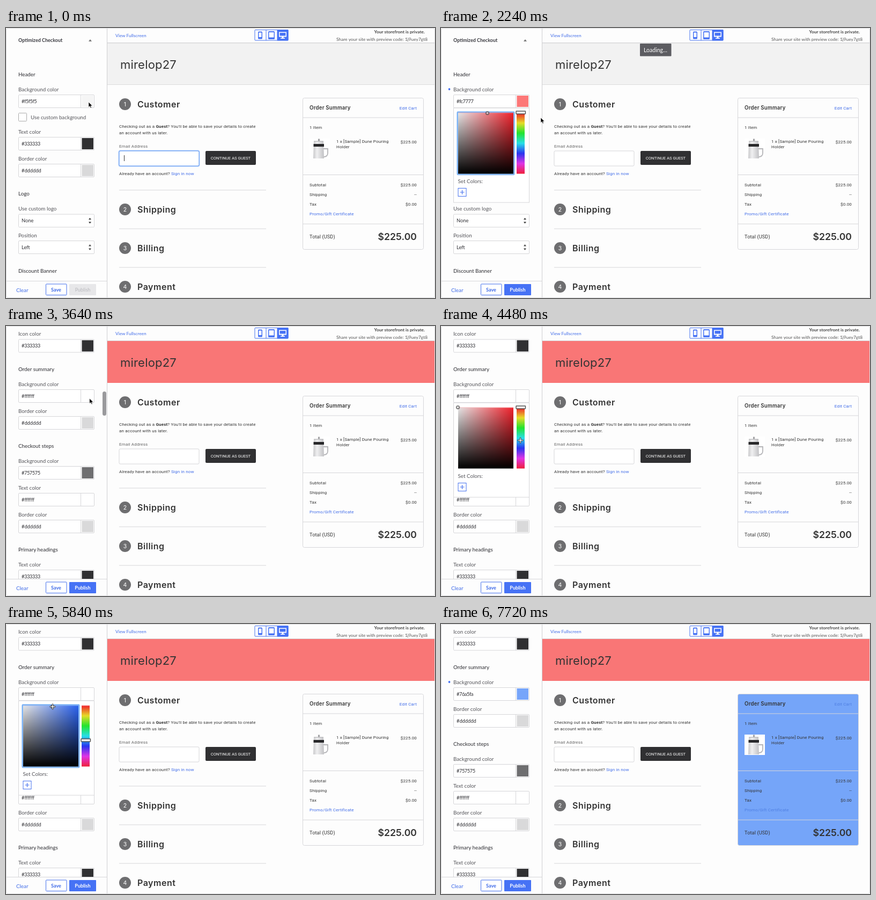
An HTML page that plays this animation: 800 by 503 pixels, repeating every 7.76 s.

```html
<!DOCTYPE html>
<html lang="en">
<head>
<meta charset="utf-8">
<title>Checkout theme editor</title>
<style>
html, body { margin: 0; width: 100%; height: 100%; overflow: hidden; background: #fdfdfd; }
svg { display: block; width: 100vw; height: 100vh; }
text { white-space: pre; fill: #333; }

/* editor type */
.ui { font: 9.8px Lato, sans-serif; fill: #55555a; }
.group { font: 9.8px Lato, sans-serif; fill: #2b2b30; }
.title { font: 700 9px Lato, sans-serif; fill: #3a3a40; }
.value { font: 9.3px Lato, sans-serif; fill: #2f2f34; }
.digits { letter-spacing: -.45px; }
.bar { font: 8.4px Lato, sans-serif; fill: #555; }
.strong { font-weight: 700; fill: #444; }
.toast { font: 10.5px Lato, sans-serif; fill: #fff; }
.link { fill: #3f6be8; }
.button { font: 700 9px Lato, sans-serif; }
.white { fill: #fff; }
.muted { font-weight: 400; fill: #b9b9bd; }

/* storefront type */
.shop { font: 22px Inter, sans-serif; letter-spacing: .2px; fill: #333; }
.step { font: 600 16px Inter, sans-serif; letter-spacing: .5px; fill: #333; }
.num { font: 10.5px Inter, sans-serif; fill: #fff; }
.card { font: 600 9.7px Inter, sans-serif; letter-spacing: .2px; }
.body { font: 8px Roboto, sans-serif; letter-spacing: .17px; }
.soft { fill: #666; }
.total { font: 9.2px Roboto, sans-serif; letter-spacing: .1px; }
.price { font: 600 17.7px Inter, sans-serif; }
.cta { font: 7.7px Roboto, sans-serif; fill: #fff; }
.end { text-anchor: end; }
.mid { text-anchor: middle; }

.box { fill: #fff; stroke: #d6d6d9; }
.rule { stroke: #d6d6d9; fill: none; }
.blueLine { fill: #fff; stroke: #4470ee; }
.blue { fill: #4672f5; }

/* timeline: everything shares one 7760 ms loop */
.t { animation: 7760ms step-end infinite; }
.start { animation-name: start; }
.after1 { animation-name: after1; }
.before1 { animation-name: before1; }
.after2 { animation-name: after2; }
.before2 { animation-name: before2; }
#toast { animation-name: toast; }
#head { animation-name: head; }
#card { animation-name: card; }
.cardLink { animation-name: cardLink; }
#scroll { animation-name: scroll; }
#thumb { animation-name: thumb; }
#cursor { animation-name: cursor; }
#arrow { animation-name: arrow; }
#cross { animation-name: cross; }
#pick1 { animation-name: pick1; }
#pick2 { animation-name: pick2; }
#pick1 .ring { animation-name: ring1; }
#pick2 .ring { animation-name: ring2; }
#pick1 .dot { animation-name: dot1; }
#pick2 .dot { animation-name: dot2; }
#pick1 .hue { fill: #f0222c; }
#pick2 .hue { animation-name: hue; }
#pick2 .slider { animation-name: slider; }

@keyframes start { 0% { opacity: 1 } 5.67%, to { opacity: 0 } }
@keyframes before1 { 0% { opacity: 1 } 20.6%, to { opacity: 0 } }
@keyframes after1 { 0% { opacity: 0 } 20.6%, to { opacity: 1 } }
@keyframes before2 { 0% { opacity: 1 } 76.3%, to { opacity: 0 } }
@keyframes after2 { 0% { opacity: 0 } 76.3%, to { opacity: 1 } }
@keyframes toast { 0%, 34.5%, 91.8%, to { opacity: 0 } 27.3%, 83.5% { opacity: 1 } }
@keyframes head { 0% { fill: #f2f2f2; stroke: #dcdcdc } 34.5%, to { fill: #f97676; stroke: #f97676 } }
@keyframes card { 0% { fill: #fdfdfd } 91.8%, to { fill: #75a5f9 } }
@keyframes cardLink { 0% { fill: #3f6be8 } 91.8%, to { fill: #4f7fe2 } }
@keyframes pick1 { 0%, 29.9%, to { visibility: hidden } 5.67% { visibility: visible } }
@keyframes pick2 { 0%, 83.5%, to { visibility: hidden } 50% { visibility: visible } }
@keyframes ring1 { 0% { opacity: 0 } 15.5%, to { opacity: 1 } }
@keyframes ring2 { 0% { opacity: 0 } 73.7%, to { opacity: 1 } }
@keyframes dot1 {
  0% { transform: translate(31.5px, 25px) }
  15.5% { transform: translate(92px, 26.5px); animation-timing-function: ease-in-out }
  18%, to { transform: translate(86.5px, 22px) }
}
@keyframes dot2 {
  0% { transform: translate(31.5px, 21px) }
  73.7%, to { transform: translate(86.5px, 23.5px) }
}
@keyframes hue { 0% { fill: #f0222c } 59.3%, to { fill: #2a62ee } }
@keyframes slider {
  0% { transform: none }
  59.3% { transform: translateY(62px); animation-timing-function: linear }
  61.3%, to { transform: translateY(65px) }
}
@keyframes scroll {
  0% { transform: none }
  30.93% { transform: none; animation-timing-function: cubic-bezier(.4, 0, .7, .8) }
  36.6% { transform: translateY(-447px); animation-timing-function: ease-out }
  41.24%, to { transform: translateY(-565px) }
}
@keyframes thumb {
  0% { transform: translateY(2px); opacity: 0 }
  30.93% { transform: translateY(2px); opacity: 1; animation-timing-function: cubic-bezier(.4, 0, .7, .8) }
  36.6% { transform: translateY(97px); opacity: 1; animation-timing-function: ease-out }
  41.24% { transform: translateY(122px); opacity: 1 }
  46.4% { transform: translateY(122px); opacity: 1; animation-timing-function: linear }
  49.5%, to { transform: translateY(122px); opacity: 0 }
}
@keyframes cursor {
  0%, 5.67% { transform: translate(154px, 138px); animation-timing-function: ease-in-out }
  13.4%, 14.95% { transform: translate(92px, 163px); animation-timing-function: ease-in-out }
  18%, 20.1% { transform: translate(87px, 158px); animation-timing-function: ease-in-out }
  26.3%, 41.75% { transform: translate(186px, 167px); animation-timing-function: ease-in-out }
  48.45%, 50% { transform: translate(152px, 131px); animation-timing-function: ease-in-out }
  56.7%, 58.8% { transform: translate(148px, 213px); animation-timing-function: ease-in-out }
  61.3%, 64.4% { transform: translate(148px, 216px); animation-timing-function: ease-in-out }
  73.2%, 76.8% { transform: translate(87px, 154px); animation-timing-function: ease-in-out }
  82.5%, 90.2% { transform: translate(186px, 167px); animation-timing-function: ease-in }
  95.4%, to { transform: translate(186px, 515px) }
}
@keyframes arrow { 0%, 23.6%, 80.4%, to { opacity: 1 } 8.2%, 52% { opacity: 0 } }
@keyframes cross { 0%, 23.6%, 80.4%, to { opacity: 0 } 8.2%, 52% { opacity: 1 } }
</style>
</head>
<body>
<svg viewBox="0 0 800 503" preserveAspectRatio="none">
  <defs>
    <linearGradient id="toWhite"><stop stop-color="#e6e6e6"/><stop offset="1" stop-color="#e6e6e6" stop-opacity="0"/></linearGradient>
    <linearGradient id="toBlack" x2="0" y2="1"><stop stop-opacity="0"/><stop offset="1"/></linearGradient>
    <linearGradient id="rainbow" x2="0" y2="1">
      <stop stop-color="#f0202c"/><stop offset=".167" stop-color="#e6dc28"/><stop offset=".333" stop-color="#22e42e"/>
      <stop offset=".5" stop-color="#28dfe8"/><stop offset=".667" stop-color="#2a34f0"/>
      <stop offset=".833" stop-color="#e034e6"/><stop offset="1" stop-color="#f0203a"/>
    </linearGradient>
    <linearGradient id="steel"><stop stop-color="#c9c9cb"/><stop offset=".35" stop-color="#f0f0f1"/><stop offset="1" stop-color="#c2c2c5"/></linearGradient>
    <clipPath id="panel"><path d="M0 0H188V471H0z"/></clipPath>
  </defs>
  <rect width="800" height="503" fill="#fdfdfd"/>

  <!-- storefront -->
  <rect id="head" class="t" x="188.5" y="28" width="613" height="77.5"/>
  <path class="rule" d="M189 27.5H800"/>
  <path class="rule" d="M211 302H485M211 374H485M211 446H485"/>
  <rect class="box" x="211" y="229" width="149" height="28" rx="2"/>
  <g class="t start">
    <rect x="211" y="229" width="149" height="28" rx="2" fill="none" stroke="#b9d3fb" stroke-width="3"/>
    <rect x="211" y="229" width="149" height="28" rx="2" fill="#fff" stroke="#4f8df0"/>
    <path d="M220.5 237V248" stroke="#333"/>
  </g>
  <rect x="372" y="229" width="94" height="26" rx="2" fill="#303032"/>
  <rect id="card" class="t" x="553.5" y="130.5" width="225" height="282" rx="3" stroke="#d6d6d9"/>
  <path class="rule" d="M554 167H778M554 273.5H778M554 365H778"/>
  <g>
    <rect x="566" y="206" width="38" height="38" fill="#fff"/>
    <path d="M592 225H600V233Q600 240 592 240" fill="none" stroke="#b4b4b7" stroke-width="1.8"/>
    <path d="M574 211H592L593 243H573z" fill="url(#steel)"/>
    <path d="M574 211H592" stroke="#a8a8ab"/>
    <path d="M582 206.500H585V210.500H582z" fill="#a0a0a3"/>
    <path d="M573.500 216H593V221H573.500z" fill="#29292b"/>
  </g>
  <g id="store"></g>

  <!-- top bar -->
  <g>
    <rect class="blueLine" x="464" y="3.500" width="62" height="19.500" rx="1"/>
    <path class="blueLine" d="M485 3.500V23"/>
    <rect class="blue" x="505.500" y="3" width="21" height="20.500" rx="1"/>
    <rect class="blue" x="470" y="6.500" width="8" height="14" rx="1.500"/>
    <path d="M471.500 8.500H476.500V17H471.500z" fill="#fff"/>
    <rect class="blue" x="489" y="6" width="12" height="15" rx="1.500"/>
    <path d="M490.500 8H499.500V17.500H490.500z" fill="#fff"/>
    <path d="M509 7.500H523V16.500H509zM514.500 16H517.500V18.500H520V20H512V18.500H514.500z" fill="#fff"/>
    <path class="blue" d="M510.500 9H521.500V14.500H510.500z"/>
  </g>
  <g id="toast" class="t">
    <rect x="371" y="29" width="58.500" height="23.500" rx="1" fill="#5c5c61"/>
  </g>

  <!-- editor panel -->
  <rect width="188" height="503" fill="#fdfdfd"/>
  <g clip-path="url(#panel)">
    <g id="scroll" class="t"></g>
    <rect id="thumb" class="t" x="180" width="7" height="45" rx="3.500" fill="#858588"/>
  </g>
  <path class="rule" d="M0 471.500H188"/>
  <path d="M188.500 0V503" stroke="#cfcfd2"/>
  <rect class="blueLine" x="74.500" y="477" width="38.500" height="20.500" rx="1"/>
  <rect x="118" y="477" width="50" height="21" rx="1" fill="#e7e7e9"/>
  <g id="foot"></g>
  <rect x=".5" y=".5" width="799" height="502" rx="3" fill="none" stroke="#dedee0"/>

  <g id="cursor" class="t">
    <path id="arrow" class="t" d="M0 0V9.500L2.200 7.500L3.800 11L5.400 10.300L3.900 7H7z" fill="#000" stroke="#fff" stroke-width=".6"/>
    <path id="cross" class="t" d="M-1-5H1V-1H5V1H1V5H-1V1H-5V-1H-1z" fill="#fff" stroke="#333" stroke-width=".8"/>
  </g>
</svg>
<script>
const $ = id => document.getElementById(id);
const add = (id, markup) => $(id).insertAdjacentHTML('beforeend', markup);

// y is the middle of the capitals
const text = (x, y, s, cls) => `<text x="${x}" y="${y}" dy=".36em" class="${cls}">${s}</text>`;
const valueText = (y, s, cls = '') => text(29, y, s, `value ${/\d{2}|\d.\d/.test(s) ? 'digits' : ''} ${cls}`);
const swatch = (y, color, cls = '') =>
  `<rect x="141.500" y="${y - 10.5}" width="21.500" height="21" fill="${color}" class="${cls}"/>`;
const shade = { '#333333': '#303032', '#757575': '#6e6e70', '#dddddd': '#d9d9da', '#e5e5e5': '#e1e1e2' };

const frame = y => `<rect class="box" x="23.500" y="${y - 12}" width="141" height="24" rx="1.500"/>`;

function field(label, y, color, change) {
  const out = text(23, y - 22.5, label, 'ui') + frame(y) + `<path class="rule" d="M139.500 ${y - 12}v24"/>`;
  const fill = shade[color] || color;
  if (!change) return out + valueText(y, color) + swatch(y, fill);
  const { next, n } = change, before = `t before${n}`, after = `t after${n}`;
  return out + valueText(y, color, before) + swatch(y, fill, before)
    + valueText(y, next, after) + swatch(y, next, after)
    + `<circle cx="15.500" cy="${y - 22.5}" r="1.900" class="blue ${after}"/>`;
}

const select = (label, y, s) => text(23, y - 22.5, label, 'ui') + frame(y) + valueText(y, s)
  + `<path d="M154 ${y - 2}l2.500-3.500 2.500 3.500zM154 ${y + 2}l2.500 3.500 2.500-3.500z" fill="#444"/>`;

const picker = (id, y) => {
  const area = fill => `<rect x="32" y="21.500" width="103" height="113.500" ${fill}/>`;
  return `<g transform="translate(0 ${y})"><g id="${id}" class="t">
    <rect class="box" x="23.500" y="12.500" width="141" height="176"/>
    <rect class="ring t" x="30.500" y="20" width="106" height="116.500" rx="1" fill="#b5d6fc" stroke="#6fabf4" stroke-width="2"/>
    ${area('class="hue t"')}${area('fill="url(#toWhite)"')}${area('fill="url(#toBlack)"')}
    <rect x="141" y="21.500" width="15" height="113.500" fill="url(#rainbow)"/>
    <rect class="slider t" x="140" y="18.500" width="17.500" height="5" rx=".5" fill="#fff" stroke="#444" stroke-width="1.300"/>
    <circle class="dot t" r="2.700" fill="#fff" fill-opacity=".5" stroke="#444" stroke-width="1.300"/>
    ${text(31.5, 148.5, 'Set Colors:', 'ui')}
    <rect class="blueLine" x="32" y="162" width="15" height="15"/>
    <path d="M35.500 169.500h8M39.500 165.500v8" stroke="#4470ee" stroke-width="1.200"/>
  </g></g>`;
};

const group = (y, s) => text(23, y, s, 'group');
add('scroll', [
  text(23, 23, 'Optimized Checkout', 'title'),
  '<path d="M154 25l3-4 3 4z" fill="#777"/>',
  group(86, 'Header'),
  field('Background color', 136.5, '#f5f5f5', { next: '#fc7777', n: 1 }),
  '<rect class="box" x="23.500" y="158.500" width="15" height="15" rx="1" style="stroke:#aaa"/>',
  text(46, 166.5, 'Use custom background', 'ui'),
  field('Text color', 215.5, '#333333'),
  field('Border color', 265.5, '#dddddd'),
  group(308.5, 'Logo'),
  select('Use custom logo', 359, 'None'),
  select('Position', 408.5, 'Left'),
  group(452, 'Discount Banner'),
  field('Background color', 502.5, '#e5e5e5'),
  field('Text color', 552, '#333333'),
  field('Icon color', 602, '#333333'),
  group(645, 'Order summary'),
  field('Background color', 695.5, '#ffffff', { next: '#76a5fa', n: 2 }),
  field('Border color', 745.5, '#dddddd'),
  group(788, 'Checkout steps'),
  field('Background color', 838.5, '#757575'),
  field('Text color', 888.5, '#ffffff'),
  field('Border color', 938.5, '#dddddd'),
  group(981, 'Primary headings'),
  field('Text color', 1031.5, '#333333'),
  picker('pick1', 136.5),
  picker('pick2', 695.5)
].join(''));

add('foot', text(19, 488, 'Clear', 'ui link') + text(93.5, 487.5, 'Save', 'button link mid')
  + text(143, 487.5, 'Publish', 'button muted mid')
  + '<g class="t after1"><rect class="blue" x="118" y="477" width="50" height="21" rx="1"/>'
  + text(143, 487.5, 'Publish', 'button white mid') + '</g>');
add('toast', text(400, 41, 'Loading…', 'toast mid'));

const steps = [[142, 'Customer'], [338, 'Shipping'], [410, 'Billing'], [482, 'Payment']];
const amounts = [[292, 'Subtotal', '$225.00'], [310.5, 'Shipping', '--'], [328.5, 'Tax', '$0.00']];
add('store', [
  text(204, 14, 'View Fullscreen', 'bar link'),
  text(781, 7, 'Your storefront is private.', 'bar strong end'),
  text(786, 20.5, 'Share your site with preview code: 1j9uey7gt8', 'bar end'),
  text(213, 68, 'mirelop27', 'shop'),
  ...steps.map(([y, s], i) => `<circle cx="222" cy="${y}" r="11" fill="#6e6e70"/>`
    + text(222, y, i + 1, 'num mid') + text(245, y, s, 'step')),
  text(211, 183.5, 'Checking out as a <tspan font-weight="700">Guest</tspan>? You\'ll be able to save your details to create', 'body'),
  text(211, 195.5, 'an account with us later.', 'body'),
  text(211, 220, 'Email Address', 'body soft'),
  text(419, 242.5, 'CONTINUE AS GUEST', 'cta mid'),
  text(211, 271.5, 'Already have an account? <tspan class="link">Sign in now</tspan>', 'body'),
  text(566, 149, 'Order Summary', 'card'),
  text(766, 149.5, 'Edit Cart', 'body end t cardLink'),
  text(566, 185.5, '1 Item', 'body'),
  text(616, 211, '1 x [Sample] Dune Pouring', 'body'),
  text(616, 221, 'Holder', 'body'),
  text(766, 212, '$225.00', 'body end'),
  ...amounts.map(([y, s, v]) => text(566, y, s, 'body') + text(766, y, v, 'body end')),
  text(566, 346.5, 'Promo/Gift Certificate', 'body t cardLink'),
  text(566, 388.5, 'Total (USD)', 'total'),
  text(766, 389, '$225.00', 'price end')
].join(''));
</script>
</body>
</html>
```
